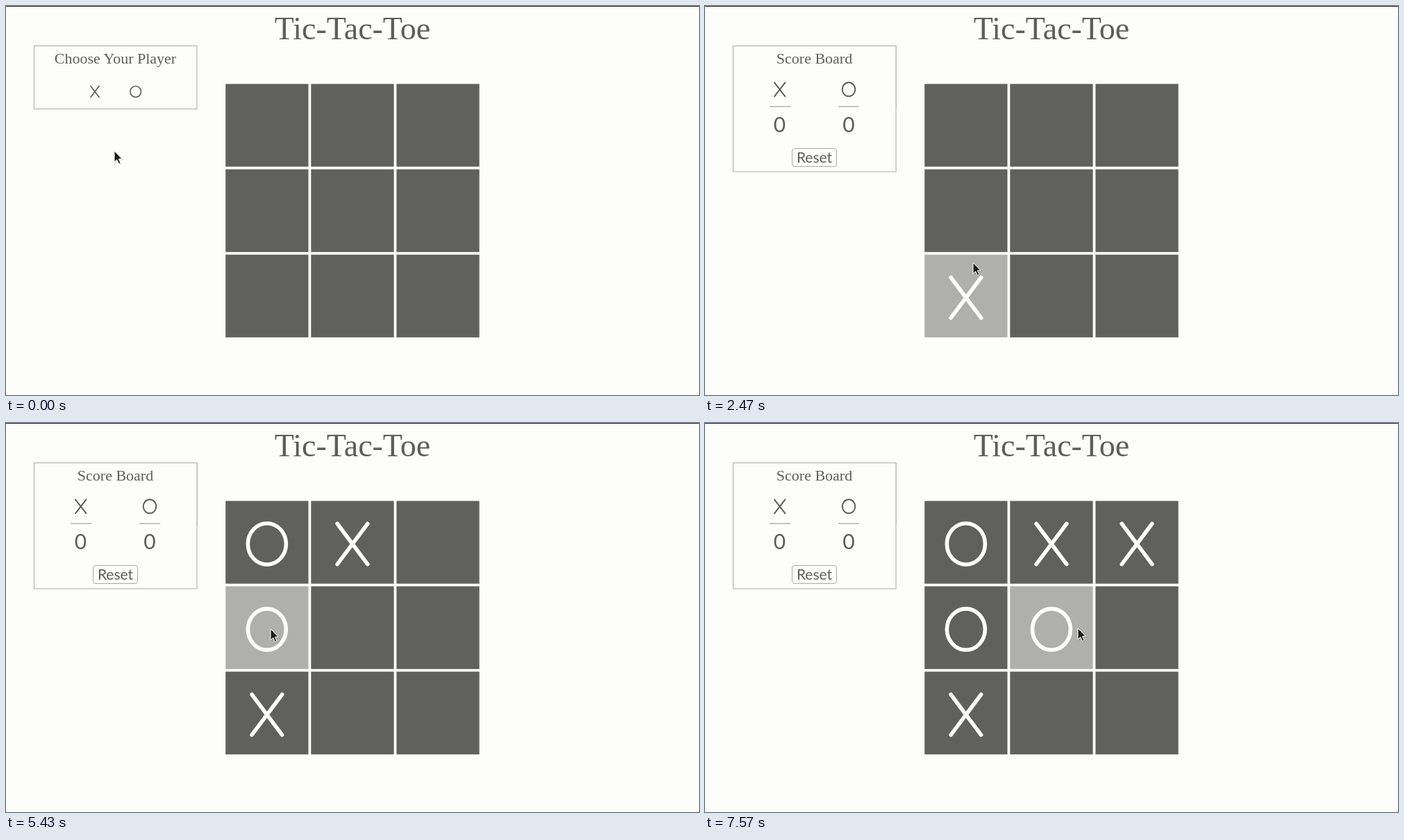
Animation, 998 px wide and 561 px high, one loop 8000 ms. Source, as an HTML page:

```html
<!DOCTYPE html>
<html lang="en">
<head>
<meta charset="utf-8">
<title>Tic-Tac-Toe</title>
<style>
  html, body { margin: 0; width: 100%; height: 100%; overflow: hidden; background: #fdfdfc; }
  svg { display: block; width: 998px; height: 561px; }
  text { fill: #5d5d5c; text-anchor: middle; }
  .serif { font: 22px "Liberation Serif", serif; }
  .title { font-size: 46px; }
  .sans { font: 400 21px Lato, sans-serif; }
  .digit { font-size: 30px; }
  .panel { fill: #fdfdfc; stroke: #a9a9a8; }
  .rule { stroke: #8b8b8a; fill: none; }
  .button { stroke: #a9a9a8; fill: none; }
  .mark { fill: none; stroke: #5d5d5c; stroke-linecap: round; }
  #board .mark { stroke: #fdfdfb; }
  #board rect { fill: #60605f; }
  #board rect.hover { fill: #afafae; }
</style>
</head>
<body>
<svg viewBox="0 0 998 561">
  <rect width="998" height="1" fill="#222"/>
  <text class="serif title" x="499" y="48">Tic-Tac-Toe</text>
  <g id="board"></g>
  <g id="choose">
    <rect class="panel" x="40.5" y="57.5" width="234.5" height="91"/>
    <text class="serif" x="157.5" y="83">Choose Your Player</text>
  </g>
  <g id="score">
    <rect class="panel" x="40.5" y="57.5" width="234.5" height="181.5"/>
    <text class="serif" x="157.5" y="83">Score Board</text>
    <path class="rule" d="M93 145h30M192 145h30"/>
    <text class="sans digit" x="107.5" y="182">0</text>
    <text class="sans digit" x="207" y="182">0</text>
    <rect class="button" x="125.5" y="205.5" width="64" height="26" rx="3.5"/>
    <text class="sans" x="157.5" y="226">Reset</text>
  </g>
  <g id="cursor">
    <path d="M1 2V18L5 14.5L7.7 20L10.5 18.8L8 13.4L13 13Z" fill="#000" opacity=".15"/>
    <path d="M0 0V16L3.7 12.7L6.4 18.6L9 17.4L6.4 11.8L11 11.4Z" fill="#1c1c1c" stroke="#fff" stroke-width="1"/>
  </g>
</svg>
<script>
const LOOP = 8000, PITCH = 123.1, SIZE = 119.3, LEFT = 316.2, TOP = 112.4;
const $ = id => document.getElementById(id);

function add(parent, tag, attrs) {
  const el = document.createElementNS('http://www.w3.org/2000/svg', tag);
  for (const key in attrs) el.setAttribute(key, attrs[key]);
  return parent.appendChild(el);
}

// rx, ry: half extents along the stroke's centre line
function addMark(parent, kind, cx, cy, rx, ry, width) {
  const base = { class: 'mark', 'stroke-width': width };
  return kind === 'X'
    ? add(parent, 'path', { ...base, d:
        `M${cx - rx} ${cy - ry}L${cx + rx} ${cy + ry}M${cx + rx} ${cy - ry}L${cx - rx} ${cy + ry}` })
    : add(parent, 'ellipse', { ...base, cx, cy, rx, ry });
}

addMark($('choose'), 'X', 128, 123.5, 6, 8, 1.7);
addMark($('choose'), 'O', 186.7, 123.5, 7.8, 8, 1.7);
addMark($('score'), 'X', 107.7, 120.3, 7.7, 10, 2);
addMark($('score'), 'O', 207, 120.3, 9.3, 10, 2);

const cells = Array.from({ length: 9 }, (_, i) => {
  const x = LEFT + i % 3 * PITCH, y = TOP + Math.floor(i / 3) * PITCH;
  const el = add($('board'), 'rect', { x, y, width: SIZE, height: SIZE });
  return { x, y, el };
});

// [time, cell, mark]
const moves = [
  [2470, 6, 'X'], [3270, 0, 'O'], [4270, 1, 'X'],
  [5430, 3, 'O'], [6930, 2, 'X'], [7570, 4, 'O']
].map(([at, i, kind]) => {
  const { x, y } = cells[i], isX = kind === 'X';
  const el = addMark($('board'), kind, x + SIZE / 2, y + SIZE / 2 + 2.4,
    isX ? 21.8 : 27.5, isX ? 29.2 : 29.7, 5.6);
  return { at, el };
});

// [start, end, x, y]: the pointer travels to x, y between start and end
const start = [156, 209];
const trips = [
  [40, 770, 131, 122],
  [1770, 2260, 386, 370],
  [2500, 2930, 378, 190],
  [3300, 3630, 515, 201],
  [4300, 4600, 396, 288],
  [4740, 4900, 381, 297],
  [5900, 6500, 617, 198],
  [6960, 7500, 537, 296]
];

const clamp = v => Math.min(1, Math.max(0, v));
const smooth = v => v * v * (3 - 2 * v);
const easeOut = v => 1 - (1 - v) ** 1.56;

function pointer(t) {
  let [x, y] = start;
  for (const [from, to, tx, ty] of trips) {
    const k = smooth(clamp((t - from) / (to - from)));
    x += (tx - x) * k;
    y += (ty - y) * k;
  }
  return [x, y];
}

function draw(t) {
  const [x, y] = pointer(t);
  $('cursor').setAttribute('transform', `translate(${x} ${y})`);
  const slide = -280 * (1 - easeOut(clamp((t - 900) / 800)));
  $('score').setAttribute('transform', `translate(${slide} 0)`);
  for (const c of cells) {
    const over = x >= c.x && x < c.x + SIZE && y >= c.y && y < c.y + SIZE;
    c.el.classList.toggle('hover', over);
  }
  for (const m of moves) m.el.style.visibility = t >= m.at ? 'visible' : 'hidden';
}

const origin = performance.now();
function tick() {
  draw((performance.now() - origin) % LOOP);
  requestAnimationFrame(tick);
}
draw(0);
requestAnimationFrame(tick);
</script>
</body>
</html>
```
